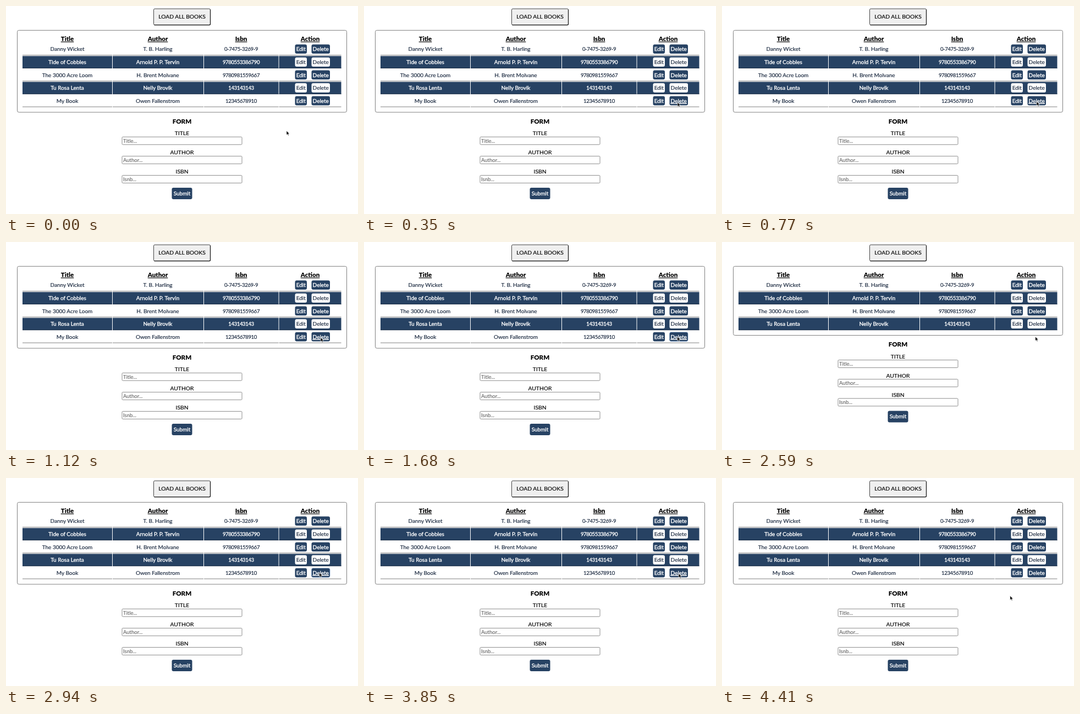
An HTML page for the animation above (4480 ms loop, 640 by 380 pixels).

```html
<!DOCTYPE html>
<html lang="en">
<head>
<meta charset="utf-8">
<title>Book list</title>
<style>
  html, body { margin: 0; width: 100%; height: 100%; overflow: hidden; background: #fff; }
  svg { display: block; width: 640px; height: 380px; font: 10px Lato, "Open Sans", sans-serif; }
  text { text-anchor: middle; fill: #14233a; stroke: #14233a; stroke-width: .15px; white-space: pre; }
  .caps { font-size: 10.3px; fill: #000; stroke: #000; }
  .head { font-size: 11.5px; font-weight: 900; fill: #000; stroke: none; }
  .line { text-decoration: underline; }
  .num { font-size: 9.6px; letter-spacing: -.4px; }
  .light { fill: #fff; stroke: #fff; stroke-width: .35px; }
  .hint { font-size: 9.5px; text-anchor: start; fill: #6a6a6a; stroke: #6a6a6a; }
</style>
</head>
<body>
<svg id="stage" viewBox="0 0 640 380"></svg>
<script>
const NAVY = '#274263', LOOP = 4480, STEP = 70, PITCH = 23.6;
const stage = document.getElementById('stage');

function add(parent, tag, attrs, content) {
  const el = document.createElementNS('http://www.w3.org/2000/svg', tag);
  for (const key in attrs) el.setAttribute(key, attrs[key]);
  if (content) el.textContent = content;
  return parent.appendChild(el);
}
const group = parent => add(parent, 'g', {});
const label = (parent, x, y, content, cls = '') => add(parent, 'text', { x, y, class: cls }, content);
const box = (parent, x, y, width, height, fill, more = {}) =>
  add(parent, 'rect', { x, y, width, height, fill, ...more });

// Load button
box(stage, 268.5, 5.1, 103, 29.5, '#efefef', { rx: 2, stroke: '#444' });
add(stage, 'path', { d: 'M269.5 34.6H370Q371.5 34.6 371.5 33V6.5', fill: 'none', stroke: '#111', 'stroke-width': 1.2 });
label(stage, 320, 23.4, 'LOAD ALL BOOKS', 'caps');

// Book table
const panel = box(stage, 20.5, 44.4, 599, 149.7, 'none', { rx: 3, stroke: '#808080' });
const columns = [[30, 163, 111.5], [194, 165, 276], [360, 135.5, 427.5], [496.5, 113, 553]];
['Title', 'Author', 'Isbn', 'Action'].forEach((name, i) =>
  label(stage, columns[i][2], 64, name, 'head line'));

const books = [
  ['Danny Wicket', 'T. B. Harling', '0-7475-3269-9'],
  ['Tide of Cobbles', 'Arnold P. P. Tervin', '9780553386790'],
  ['The 3000 Acre Loom', 'H. Brent Molvane', '9780981559667'],
  ['Tu Rosa Lenta', 'Nelly Brovik', '143143143'],
  ['My Book', 'Owen Fallenstrom', '12345678910']
];

function drawBook(book, i) {
  const row = group(stage), dark = i % 2 === 1;
  const top = 67.8 + PITCH * i, base = top + 14.5;
  columns.forEach(([x, width, middle], c) => {
    if (dark) box(row, x, top, width, 22.5, NAVY);
    box(row, x, top + 21.5, width, 1, dark ? '#1d3049' : '#808080');
    if (c < 3) label(row, middle, base, book[c], (c === 2 ? 'num ' : '') + (dark ? 'light' : ''));
  });
  const button = (x, width, name) => {
    box(row, x, base - 12, width, 16.8, dark ? '#fff' : NAVY, { rx: 3 });
    return label(row, x + width / 2, base, name, dark ? '' : 'light');
  };
  button(525.5, 21.5, 'Edit');
  return { row, remove: button(555.5, 33.5, 'Delete') };
}
const last = books.map(drawBook).pop();
const ring = box(last.row, 555.5, 164.7, 33.5, 16.8, 'none',
  { rx: 3, stroke: '#86abd9', 'stroke-opacity': .6 });

// Form
const form = group(stage);
label(form, 320, 214.5, 'FORM', 'head');
[['TITLE', 'Title...'], ['AUTHOR', 'Author...'], ['ISBN', 'Isnb...']].forEach(([name, hint], i) => {
  const y = 236.2 + 35.1 * i;
  label(form, 320, y, name, 'caps');
  box(form, 211, y + 3, 218, 14, '#fff', { rx: 1.5, stroke: '#8c8c8c' });
  label(form, 213, y + 13.6, hint, 'hint');
});
box(form, 301.5, 332, 37, 21, NAVY, { rx: 3 });
label(form, 320, 346, 'Submit', 'light');

const pointer = add(stage, 'path', {
  d: 'M0 0V7.6L1.8 6L3 8.8L4.3 8.2L3.1 5.5H5.5Z',
  fill: '#000', stroke: '#fff', 'stroke-width': .6
});

// Pointer positions on the way in; the way out runs backwards
const path = [[510, 228], [523.8, 215.2], [540, 202], [555, 189], [565, 181], [570, 176], [572, 174.5]];
const show = (el, on) => el.setAttribute('visibility', on ? 'inherit' : 'hidden');

function draw(time) {
  const t = time % LOOP, step = Math.floor(t / STEP);
  const during = (from, to) => t >= from && t < to;
  const near = Math.min(step, LOOP / STEP - step, path.length - 1);
  const [x, y] = during(1400, 3290) ? [569.7, 173] : path[near];
  const deleted = during(1820, 2940);

  pointer.setAttribute('transform', `translate(${x} ${y})`);
  last.remove.setAttribute('class', near >= 4 ? 'light line' : 'light');
  show(ring, during(1680, 3080) && !deleted);
  show(last.row, !deleted);
  panel.setAttribute('height', deleted ? 149.7 - PITCH : 149.7);
  form.setAttribute('transform', `translate(0 ${deleted ? -PITCH : 0})`);
}

const start = performance.now();
function tick() {
  draw(performance.now() - start);
  requestAnimationFrame(tick);
}
tick();
</script>
</body>
</html>
```
